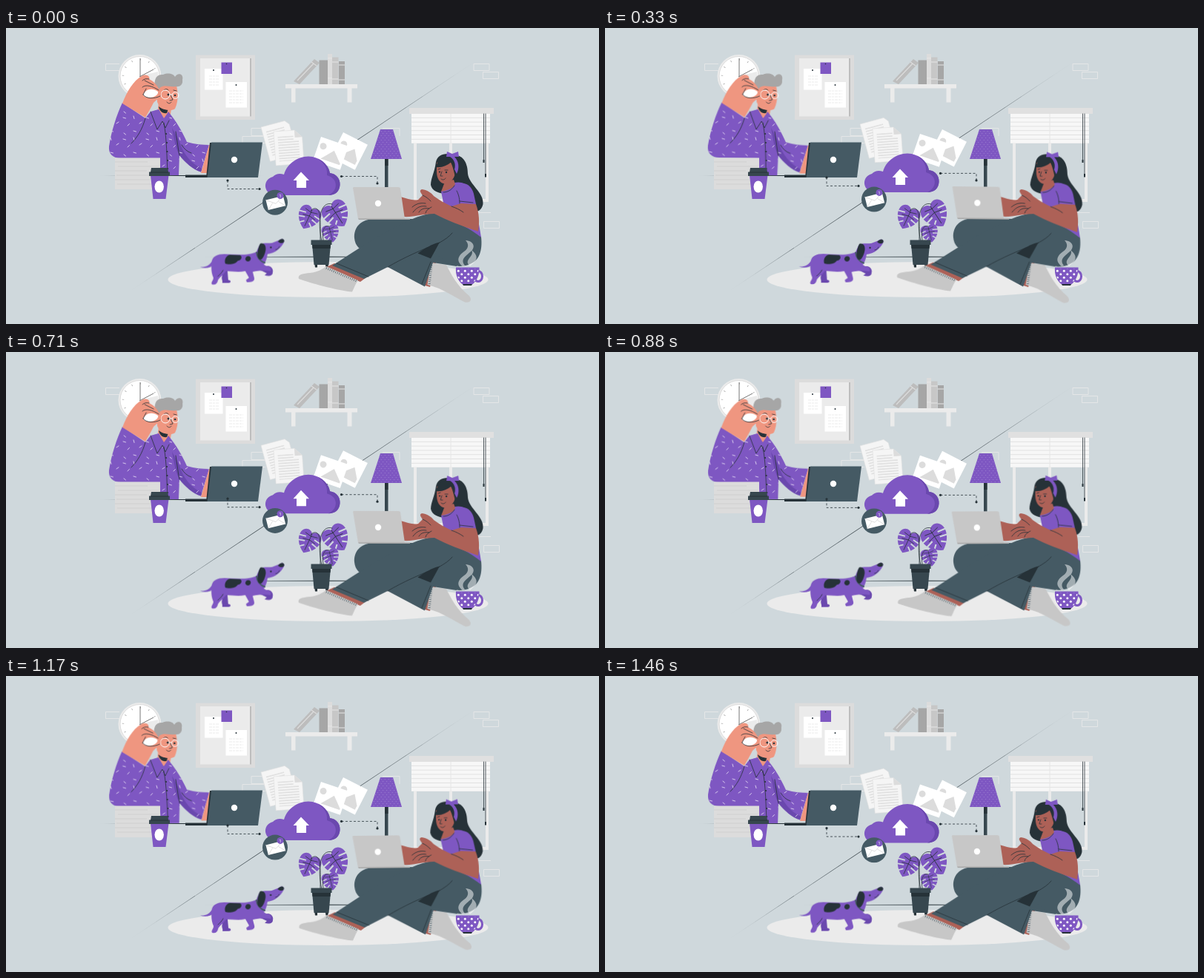
These frames come from a looping animation (800x400 px, 1500 ms). An HTML page:

```html
<!DOCTYPE html>
<html lang="en">
<head>
<meta charset="utf-8">
<title>Working together from home</title>
<style>
  html, body { margin: 0; width: 100%; height: 100%; overflow: hidden; background: #cfd8dc; }
  svg { display: block; width: 100vw; height: 100vh; }

  .p { fill: #7e57c2; }  .pd { fill: #6a48ae; }
  .s { fill: #455a64; }  .k { fill: #263238; }  .kd { fill: #37474f; }
  .w { fill: #fff; }     .g1 { fill: #ebebeb; } .g2 { fill: #dcdcdc; }
  .g3 { fill: #c7c7c7; } .g4 { fill: #a6a6a6; }
  .m { fill: #ef9680; }  .f { fill: #ad6157; }
  .ln { fill: none; stroke: #263238; stroke-width: .8; stroke-linecap: round; stroke-linejoin: round; }
  .lg { fill: none; stroke: #e4e6e7; stroke-width: 1; }
  .ws { fill: none; stroke: #fff; }

  .float, .man, .woman, .dog { animation: 750ms infinite alternate; }
  .float { animation-name: float; animation-timing-function: cubic-bezier(.33, .36, .67, .85); }
  .man, .woman, .dog {
    animation-name: sway;
    animation-timing-function: cubic-bezier(.37, 0, .63, 1);
    animation-delay: -375ms;
  }
  .man { --a: .7deg; transform-origin: 215px 145px; }
  .woman { --a: .65deg; transform-origin: 560px 270px; }
  .dog { --a: .7deg; transform-origin: 318px 315px; }
  @keyframes float { to { transform: translateY(-8px); } }
  @keyframes sway {
    from { transform: rotate(calc(-1 * var(--a))); }
    to { transform: rotate(var(--a)); }
  }
</style>
</head>
<body>
<svg viewBox="0 0 800 400" preserveAspectRatio="none">
  <defs>
    <pattern id="lines" width="40" height="3.6" patternUnits="userSpaceOnUse">
      <path d="M0 1H40" stroke="#c9c9c9" stroke-width=".8"/>
    </pattern>
    <pattern id="text" width="9" height="4" patternUnits="userSpaceOnUse">
      <path d="M0 1H3M4 1H8" stroke="#e6e6e6" stroke-width=".8"/>
    </pattern>
    <pattern id="slats" width="53" height="5.8" patternUnits="userSpaceOnUse">
      <path d="M0 5.3H53" stroke="#dedede" stroke-width=".9"/>
    </pattern>
    <pattern id="dots" width="5" height="6" patternUnits="userSpaceOnUse">
      <g fill="#a58ad6"><circle cx="1.2" cy="1.5" r=".5"/><circle cx="3.7" cy="4.5" r=".5"/></g>
    </pattern>
    <pattern id="spots" width="9" height="9" patternUnits="userSpaceOnUse" x="608" y="326">
      <g class="w"><circle cx="2.3" cy="2.3" r="1.5"/><circle cx="6.8" cy="6.8" r="1.5"/></g>
    </pattern>
    <pattern id="dashes" width="31" height="29" patternUnits="userSpaceOnUse">
      <path d="M3 5l3.500 1M17 3l1 3.500M25 13l3-2M9 16l2.500-2.500M17 23l3.500 1M4 26l2.500 2"
            fill="none" stroke="#e3d9f3" stroke-width=".9" stroke-linecap="round"/>
    </pattern>
    <linearGradient id="fade">
      <stop offset="0" stop-color="#263238" stop-opacity="0"/>
      <stop offset=".2" stop-color="#263238"/>
      <stop offset=".8" stop-color="#263238"/>
      <stop offset="1" stop-color="#263238" stop-opacity="0"/>
    </linearGradient>
    <g id="leaf">
      <path class="p" d="M0 0C3-6 14-7 17 3C20 14 11 26 0 32C-11 26-20 14-17 3C-14-7-3-6 0 0Z"/>
      <path d="M19 9L7 7M17 17L6 14M11 26L4 20M-19 9L-7 7M-17 17L-6 14M-11 26L-4 20"
            fill="none" stroke="#cfd8dc" stroke-width="2.100"/>
      <path class="ln" d="M0 0V27M0 4L10 2M0 4L-10 2M0 10L10 12M0 10L-10 12" stroke-width=".6"/>
    </g>
    <path id="shirt" d="M194 114L206 110L213 124L219 113C229 125 238 140 244 154C255 157 265 158 274 158L263 194.500C252 191 242 182 234 172L233 199H209L206 176H155C144 176 138 170 139 160C142 140 149 118 157 101L188 122Z"/>
  </defs>

  <rect width="800" height="400" fill="#cfd8dc"/>

  <!-- wall -->
  <path class="lg" d="M153 48.500H134.500V57.500H153M631 48.500H652V57.500H631ZM643.500 59.500H664.500V68.500H643.500ZM352 135.500H331V145.500H352M350 146.500H319V155.500H350M508 135.500H531V146M634 249.500H654M644.500 261.500H665.500V270.500H644.500Z"/>
  <g fill="url(#fade)">
    <path d="M163 358.500L400 200L637 42.500L400 201Z"/>
    <path d="M124 199.500L237 198.900L351 199.500L237 200Z"/>
    <path d="M259 309.200L440 308.700L620 309.200L440 309.800Z"/>
  </g>

  <circle cx="180.500" cy="65" r="29" class="g1"/>
  <circle cx="180.500" cy="65" r="26.500" class="w" stroke="#d6d6d6" stroke-width=".8"/>
  <circle cx="180.500" cy="65" r="22.500" fill="none" stroke="#9a9a9a" stroke-width="2.500" stroke-dasharray=".7 11.080"/>
  <path d="M180.500 65L205 59A26 26 0 0 1 198 84Z" class="g1"/>
  <path d="M181 66V41M180 66L199 56" fill="none" stroke="#777" stroke-width="1"/>

  <path class="g2" d="M256 36.500H336V124H256Z"/>
  <path class="g1" d="M262 41H331V119.500H262Z"/>
  <path fill="#bdbdbd" d="M329 41H331V119.500H329Z"/>
  <path class="w" d="M268 55H292.500V83.500H268ZM296.500 73H325V107.500H296.500Z"/>
  <path fill="url(#text)" d="M273 63H288V78H273ZM301 82H320V102H301Z"/>
  <path class="p" d="M290.500 46.500H305V62H290.500Z"/>
  <g class="k"><circle cx="280" cy="57" r="1"/><circle cx="310.500" cy="77" r="1"/><circle cx="297.500" cy="48.500" r=".8"/></g>

  <path fill="#bdbdbd" d="M388 72L416 42L423 47L396 76Z"/>
  <path d="M393 71L415 48M412 46L419 51" stroke="#dcdcdc" stroke-width="1.200"/>
  <path class="g4" d="M422.500 43.500H434V76H422.500ZM449 45H457V76H449Z"/>
  <path class="g2" d="M434 35H440V76H434Z"/>
  <path class="g3" d="M440 39.500H448.500V76H440Z"/>
  <path d="M434 41H440M434 68H440M440 46H448.500M440 69H448.500M449 50H457M449 70H457" stroke="#e6e6e6"/>
  <path class="g1" d="M377 76H474V81.500H377ZM385 81H390.500V100.500H385ZM460.500 81H466.500V100.500H460.500Z"/>

  <!-- window -->
  <path d="M552 116V233H649V116M600 150V232" fill="none" stroke="#ebebeb" stroke-width="4"/>
  <path fill="#f7f7f7" d="M547 116H653V156H547Z"/>
  <path fill="url(#slats)" d="M547 116H653V156H547Z"/>
  <path d="M600 116V156" stroke="#e6e6e6"/>
  <path fill="#e0e0e0" d="M544 108H658V116H544Z"/>
  <path class="ln" d="M644.500 116V181M647 116V200"/>
  <path class="k" d="M643.500 178h2v4h-2ZM646 197h2v4.500h-2Z"/>

  <ellipse cx="434.500" cy="340" rx="216" ry="24" class="g1"/>

  <!-- lamp -->
  <path class="kd" d="M511 176H515.500V250H511Z"/>
  <path class="k" d="M511 176H515.500V186H511Z"/>
  <path class="p" d="M505 137H522L534 177H492Z"/>
  <path fill="url(#dots)" d="M505 137H522L534 177H492Z"/>

  <!-- plant -->
  <use href="#leaf" transform="translate(413 246) rotate(25) scale(.87)"/>
  <use href="#leaf" transform="translate(439 241) rotate(-33) scale(1)"/>
  <use href="#leaf" transform="translate(436 269) rotate(-14) scale(.66)"/>
  <path class="ln" d="M424 288C424 270 425 252 421 246C419 243 414 243 411 247M426 288C420 262 423 233 440 238M428 287C426 273 429 266 436 268" stroke-width="1.700"/>
  <path class="kd" d="M413 292H438L435.500 320H415.500Z"/>
  <path class="k" d="M413 292H438L437.500 298H413.500ZM416.500 320H420V323.500H417ZM431 320H435L434 323.500H431.500Z"/>
  <path class="kd" d="M411.500 286.500H439.500V293H411.500Z"/>

  <!-- dog -->
  <g transform="translate(.8 .5)"><g class="dog">
    <path class="p" d="M278 313C274 321 268 323 261 322.500C268 325 275 324 281 318Z"/>
    <path class="pd" d="M286 324L291 334C289 338 292 341 291 344H300C304 343 302 340 299 340L298 328ZM338 326C345 324 349 321 353 321C358 322 360 326 359 330C359 334 354 336 348 333.500L351 331L345 328Z"/>
    <path class="p" d="M276.500 317C277 308 284 305 294 305C310 306 328 307 337 302L341 293C346 289 352 291 358 290L367 286.500C371 283 376 284 374 289.500C370 297 362 304 352 305C351 311 350 315 347 319L350 321C354 321 358 324 356 328C350 327 340 327 332 329L334 337C335 341 332 343 324 343L323 340L327 337L322 328C312 330 304 328 296 328C292 334 286 337 285 341C284 345 282 347 277 346C275 343 279 341 279 337C276 330 276 324 276.500 317Z"/>
    <path class="k" d="M295 318C293 312 297 306 302 306L315 306.500C319 309 316 314 312 314C308 320 298 319 295 318ZM322 312C322 307 329 306 329.500 311C329 316 323 316 322 312Z"/>
    <path d="M337 302C338 310 342 315 349 317" fill="none" stroke="#455a64" stroke-width="2"/>
    <path class="k" d="M342 291C348 289 351 295 349 302C347 309 344 314 341 312C337 310 338 299 342 291ZM366 288C369 284 375 283 374.500 288C373 291 369 291 366 288Z"/>
    <circle class="k" cx="356.500" cy="296" r="1.200"/>
    <path class="ln" d="M363 299C365 299 367 297 368 295M292 327C290 331 287 333 285 335" stroke-width=".6"/>
  </g></g>

  <!-- man -->
  <g class="man">
    <path class="m" d="M206 100L224 104L221 122L213 130L204 117Z"/>
    <path class="k" d="M206 106C212 111 217 111 219 109L217 115C211 116 207 112 206 106Z"/>
    <path class="m" d="M203 78C210 74 226 74 230 78C232 87 233 98 228 109C222 114 208 110 204 100Z"/>
    <path class="g4" d="M201 80C199 68 204 62 212 63C219 60 226 62 228 66C231 60 240 61 238 70C239 77 234 80 229 79C221 80 215 77 211 79C207 80 206 83 205 87Z"/>
    <path class="ln" d="M222 90L225 97L221 98M217 100C219 103 222 102 223 100M213 84C215 82 218 82 219 84M226 84L230 85"/>
    <circle class="k" cx="219" cy="90" r="1.500"/><circle class="k" cx="228" cy="91" r="1.300"/>
    <g class="ws" stroke-width="1"><circle cx="215" cy="90" r="6"/><circle cx="228.500" cy="91" r="4.400"/><path d="M221 90H224M209 88L203 85"/></g>

    <use href="#shirt" class="p"/>
    <path class="pd" d="M224 135C227 150 228 160 234 172C242 182 252 191 263 194.500L264.500 190C251 184 239 171 234 153Z"/>
    <use href="#shirt" fill="url(#dashes)"/>
    <path class="p" d="M195 113L206 110L213 122L219 114L221 124L215 135L211 127L204 137Z"/>
    <path class="ln" d="M195 113L204 137L211 126L215 135L220 125M213 128C217 150 217 175 218 199M188 122C184 137 177 148 169 156M229 140C231 152 232 163 234 172M250 169C244 167 240 163 237 158"/>
    <g class="k"><circle cx="216" cy="143" r="1.100"/><circle cx="217" cy="155" r="1.100"/><circle cx="217.500" cy="167" r="1.100"/><circle cx="218" cy="179" r="1.100"/><circle cx="218" cy="190" r="1.100"/></g>
    <path class="m" d="M157 102C163 86 172 71 183 65C190 61 195 66 193 69C199 72 204 77 206 82C210 85 210 90 208 92C206 95 202 98 199 101C196 107 192 114 188 121Z"/>
    <path class="w" d="M185 90C188 83 197 80 205 86C206 90 200 94 194 94C190 94 186 93 185 90Z"/>
    <path class="ln" d="M184 80C188 76 197 78 206 84M187 71L199 77M185 90C189 96 200 96 208 92M193 69C189 68 186 69 184 71M185 90L189 82"/>
    <path class="m" d="M274 158H284L273 196H263Z"/>
  </g>

  <!-- desk -->
  <path class="g2" d="M147 175.500H208V218H147Z"/>
  <path d="M147 181H191M151 187H206M147 193H190M149 199H208M147 205H194M150 211H208" stroke="#c7c7c7" stroke-width=".7"/>
  <path class="p" d="M195 199H219.500L215.500 231H198.500Z"/>
  <path class="kd" d="M196 189H218L219 195H195ZM193 194.500H221V200H193Z"/>
  <path d="M195 195H219" stroke="#263238"/>
  <ellipse cx="206.700" cy="214.500" rx="6.200" ry="8" class="w"/>
  <path class="k" d="M242 198.500H314V202H242ZM275 155H279L274 202H270Z"/>
  <path class="s" d="M277 154.500H346L340 202H271.500Z"/>
  <circle cx="308" cy="178" r="4.200" class="w"/>

  <!-- woman -->
  <g class="woman">
    <path class="k" d="M580 181C582 171 592 168 604 171C618 172 623 184 623 197C625 212 645 222 643.500 238C641 248 635 249 631 246L624 226L600 222C592 226 575 223 573 212C573 203 578 196 580 181Z"/>

    <path class="f" d="M564 314L580 317L572 350L562 347Z"/>
    <path class="g3" d="M573 317L594 320C600 332 609 349 625 362C629 367 627 372 619 370.500C605 364 590 352 568.500 347Z"/>
    <path d="M574 321L571 348" fill="none" stroke="#455a64" stroke-width="3" stroke-dasharray=".7 2"/>
    <path class="s" d="M498 258C478 258 469 270 470 284C471 295 478 300 486 303L515 323L565 349.500L576 317L608 322L600 280L570 258Z"/>
    <path class="f" d="M443 318L486 337L478 343L430 324Z"/>
    <path class="g3" d="M395 339C393 333 400 332 410 331C420 330 427 326 432 322L475 341C472 345 470 350 467 356.500C450 355 418 347 395 339Z"/>
    <path d="M432 324.500L473 342" stroke="#455a64" stroke-width="3" stroke-dasharray=".7 2"/>
    <path class="s" d="M570 251C596 249 622 263 641 282C643 300 640 321 612 322C598 321 588 312 577 302L515 323L483 339L440 321C480 296 530 260 570 251Z"/>
    <path class="k" d="M555.500 304.500C566 297 575 292 585 289.500L573 311.500Z"/>
    <path class="ln" d="M585 290C560 300 535 311 515 323M446 318L489 336M573 316L561 346M585 290C592 286 598 282 602 277"/>

    <path class="p" d="M587 221L605 209C613 207 622 210 626 217C632 235 638 262 641 283C630 274 618 267 604 262L590 236Z"/>
    <path class="f" d="M592 208L604 205L606 211C602 218 593 220 587 221Z"/>
    <path class="f" d="M581 182C591 176 604 180 606 190C608 198 602 209 594 210.500C585 211 581 203 581 194Z"/>
    <path class="k" d="M580.500 188C588 189 595 186 600 181.500C603 187 604 194 606 201C612 198 611 178 599 173C588 171 581 179 580.500 188Z"/>
    <path class="p" d="M594 174L595 167L602 170L610 167L611 174L605 174C611 180 612 189 608 197L605 191C607 184 605 178 599 174Z"/>
    <path class="ln" d="M588 194L586 200L589 200M587 204C589 206 592 205 593 203M583 191L586 190M592 192L596 192"/>
    <circle class="k" cx="585" cy="194.500" r="1.100"/><circle class="k" cx="594" cy="195" r="1.200"/>
    <path class="p" d="M610 212C621 207 628 214 631 224L634 238L612 237Z"/>
    <path class="ln" d="M612 237C612 229 610 224 608 220M612 234L630 236M590 222C596 222 601 219 605 213" stroke-width=".6"/>

    <path class="f" d="M532 228C541 230 549 234 556 232L562 226C558 221 558 219 561 218C569 219 574 223 577 227C584 232 592 237 601 241L614 237L634 238C638.500 250 639 263 637 275C614 267 595 260 578 251C562 251 550 256 536 255Z"/>
    <path class="ln" d="M548 242C554 237 559 236 566 237M549 249C555 241 561 240 567 241M557 249C560 244 565 243 571 244M566 250C567 246 570 244 574 242M562 226C567 228 570 231 573 234M601 241C607 243 613 246 617 249"/>
    <path class="g3" d="M468 216C468 215 469 215 470 215H529C531 215 532 216 532 217L538 258H475Z"/>
    <path class="g4" d="M475 257.500H545V259H476Z"/>
    <circle cx="502" cy="237" r="4.200" class="w"/>
  </g>

  <!-- mug -->
  <path fill="#fff" opacity=".5" d="M616 322C606 314 611 307 618 302C624 298 625 292 620 287C632 288 634 297 626 303C619 309 613 313 619 321ZM626 322C616 313 633 309 628 300C638 308 636 314 627 321Z"/>
  <ellipse cx="637" cy="335.500" rx="5.500" ry="7" fill="none" stroke="#7e57c2" stroke-width="3"/>
  <path class="p" d="M607 323.500H638.500C639 334 635 342 629 346.500H616C610 342 606 334 607 323.500Z"/>
  <path fill="url(#spots)" d="M608 325H637.500C637 334 635 341 629 345H616C610 341 608 334 608 325Z"/>
  <path class="k" d="M616 346H629L628 348H617Z"/>

  <!-- cloud upload -->
  <g class="float">
    <g transform="translate(344 134) rotate(-15)">
      <path fill="#f5f5f5" stroke="#e0e0e0" stroke-width=".6" d="M0 0H33L38 6V48H0Z"/>
      <path fill="url(#lines)" d="M5 7H30V43H5Z"/>
    </g>
    <g transform="translate(361 140) rotate(-4)">
      <path fill="#f5f5f5" stroke="#e0e0e0" stroke-width=".6" d="M0 0H28L38 10V46H0Z"/>
      <path class="g2" d="M28 0V10H38Z"/>
      <path fill="url(#lines)" d="M5 7H26V14H33V41H5Z"/>
    </g>
    <g transform="translate(455 141) rotate(27)">
      <path class="w" d="M0 0H37V38H0Z"/>
      <circle cx="8" cy="14" r="4.500" class="g2"/>
      <path class="g2" d="M7 32L24 13L34 26V32Z"/>
    </g>
    <g transform="translate(425 147) rotate(19)">
      <path class="w" d="M0 0H39V34H0Z"/>
      <circle cx="7" cy="11" r="4.500" class="g2"/>
      <path class="g2" d="M9 28L23 12L36 26V28Z"/>
    </g>
    <path class="p" d="M365 226C347 226 345 205 360 201C364 197 369 196 375 198C379 184 392 174 408 173.500C423 174 434 183 437 196C446 197 451 204 450.500 212C450 221 444 226 435 226Z"/>
    <path class="pd" d="M420 176C430 181 436 188 437 196C446 197 451 204 450.500 212C450 221 444 226 435 226C449 219 448 203 433 199C434 190 430 183 420 176Z"/>
    <path class="w" d="M398 194.500L409 206H405V216H392V206H387.500Z"/>
    <path class="ln" d="M299 206V217.500H342M452.500 200.500H501V210" stroke-width="1.100" stroke-dasharray="3 2.500" style="stroke-linecap:butt"/>
    <g class="k"><circle cx="299" cy="206" r="1.600"/><circle cx="342" cy="217.500" r="1.600"/><circle cx="452.500" cy="200.500" r="1.600"/><circle cx="501" cy="210" r="1.600"/></g>
    <circle cx="363" cy="235.700" r="17" class="s"/>
    <g transform="translate(350.500 232.500) rotate(-14)">
      <path class="w" d="M0 0H24V14H0Z"/>
      <path d="M0 0L12 8L24 0M0 14L8 6M24 14L16 6" fill="none" stroke="#d4d4d4" stroke-width=".7"/>
    </g>
    <circle cx="370" cy="226.500" r="4.500" class="p"/>
    <text x="370" y="228.700" class="w" font-family="Roboto, sans-serif" font-size="6" text-anchor="middle">1</text>
  </g>
</svg>
</body>
</html>
```
